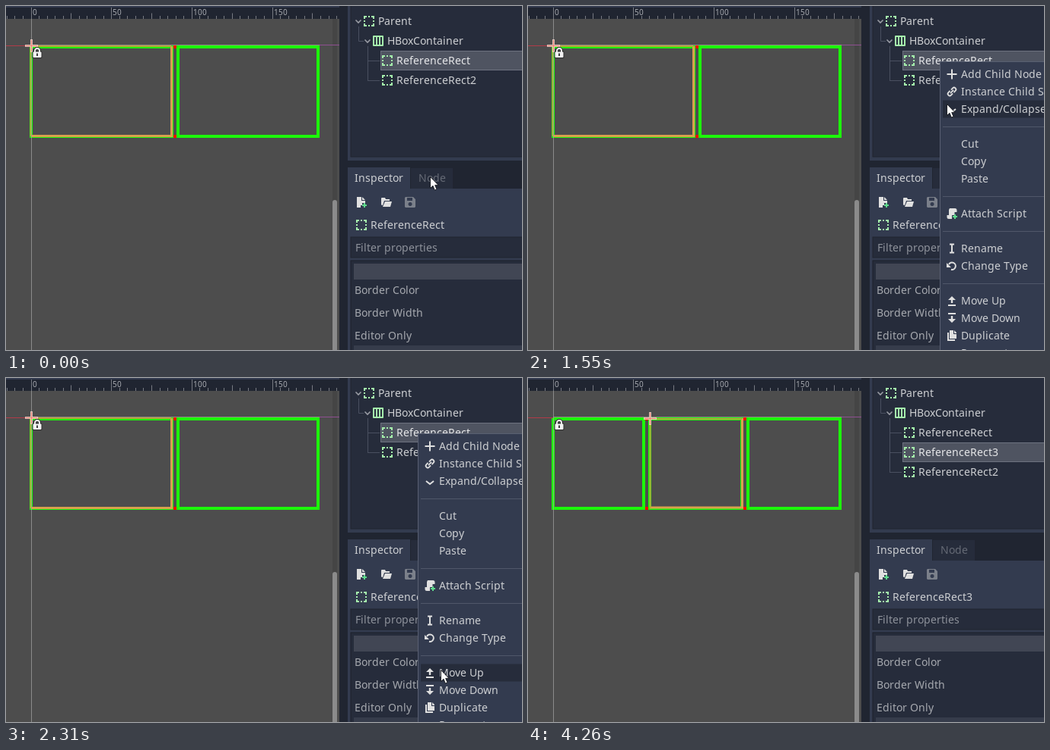
Write an HTML page that moves like this. It is 678 px wide and 454 px high and loops after 4730 ms.

```html
<!DOCTYPE html>
<html lang="en">
<head>
<meta charset="utf-8">
<title>Duplicating a node</title>
<style>
html, body { margin: 0; width: 100%; height: 100%; overflow: hidden; background: #202531; }
svg { display: block; width: 678px; height: 454px; }
text { font-family: "Noto Sans", sans-serif; }
</style>
</head>
<body>
<svg id="stage" viewBox="0 0 678 454" xmlns="http://www.w3.org/2000/svg"></svg>
<script>
const LOOP = 4730;
const BASE = '#333b4f', DARK = '#262c3b', DEEP = '#202531';
const FG = '#cdcfd2', WHITE = '#e0e0e0', GREEN = '#a5efac';

const pen = document.createElement('canvas').getContext('2d');

// Glyph advances snap to whole pixels, as with a hinted UI font.
function text(x, y, str, color = FG, size = 14) {
  pen.font = `${size}px "Noto Sans", sans-serif`;
  const xs = [];
  for (const ch of str) {
    xs.push(x);
    x += Math.round(pen.measureText(ch).width);
  }
  return `<text x="${xs.join(' ')}" y="${y}" fill="${color}" font-size="${size}">${str}</text>`;
}

const box = (x, y, w, h, fill, extra = '') =>
  `<rect x="${x}" y="${y}" width="${w}" height="${h}" fill="${fill}" ${extra}/>`;
const line = (d, color, w = 1, extra = '') =>
  `<path d="${d}" fill="none" stroke="${color}" stroke-width="${w}" ${extra}/>`;
const fill = (d, color) => `<path d="${d}" fill="${color}" fill-rule="evenodd"/>`;
const at = (x, y, body) => `<g transform="translate(${x} ${y})">${body}</g>`;
const group = (id, body) => `<g id="${id}">${body}</g>`;

const rectIcon = (x, y) =>
  at(x, y, line('M6 1H13V13H1V1Z', GREEN, 2, 'stroke-dasharray="2 2 6 2"'));
const hboxIcon = (x, y) =>
  at(x, y, line('M1 1H13V13H1ZM5 1V13M9 1V13', GREEN, 2, 'stroke-linejoin="round"'));
const fold = (x, y) => line(`M${x - 3.5} ${y - 1.5}l3.5 3.5l3.5 -3.5`, '#9a9da5', 1.6);
const plus = (x, y) => line(`M${x - 3} ${y}h6M${x} ${y - 3}v6`, '#5fdc8c', 2);

function ruler() {
  let s = box(0, 0, 438, 2, BASE) + box(0, 2, 438, 15, DEEP);
  for (let i = -3; i <= 38; i++) {
    const x = Math.floor(33 + i * 10.57) + 0.5;
    const top = i % 10 === 0 ? 2 : i % 5 === 0 ? 9.5 : 13;
    s += line(`M${x} ${top}V17`, '#777a82');
    if (i >= 0 && i % 10 === 0) s += text(Math.floor(x) + 2, 12, String(i * 5), '#a5a8ae', 10);
  }
  return s;
}

const canvasArea = () =>
  box(0, 17, 438, 437, '#4d4d4d') +
  box(429, 17, 6, 437, '#454545') +
  box(429, 256, 6, 210, '#8b8b8b', 'rx="3"') +
  ruler();

const lock = () => at(35, 54,
  line('M3 7V5a3 3 0 0 1 6 0V7', '#303030', 4) +
  box(-0.5, 5.5, 13, 9.5, '#303030', 'rx="1.5"') +
  line('M3 7V5a3 3 0 0 1 6 0V7', '#f2f2f2', 1.9) +
  box(0.5, 6.5, 11, 7.5, '#f2f2f2', 'rx="1"') +
  box(5, 8.5, 2, 3.5, '#404040'));

const cross = (x, y) => at(x, y,
  line('M-8 0.5H9M0.5 -8V9', '#f3d3cb', 3, 'opacity=".85"') +
  line('M-7 0.5H8M0.5 -7V8', '#ef8576', 1));

const frame = (x0, x1, color = '#1cf80a') =>
  `<rect x="${x0 + 2}" y="54" width="${x1 - x0 - 4}" height="118" fill="none" stroke="${color}" stroke-width="4"/>`;

function preview(spans, outline, pivot) {
  return frame(31, 412, '#ff0000') +
    spans.map(([a, b]) => frame(a, b)).join('') +
    outline +
    line('M0 52.5H33', '#b23a48') +
    line('M33 51.5H412', '#8f8a84') +
    line('M412 51.5H438', '#8f4f92') +
    line('M33.5 17V454', '#a0a0a0', 1, 'opacity=".75"') +
    cross(...pivot) + lock();
}

function tree(names, chosen) {
  const last = 46 + 26 * names.length;
  let s = line(`M475.5 53V${last + 0.5}` + names.map((_, i) => `M475 ${72.5 + 26 * i}H491`).join(''), '#4a5060');
  names.forEach((name, i) => {
    const y = 72 + 26 * i;
    const on = i === chosen;
    if (on) s += box(492.5, y - 12.5, 200, 25, '#4f5461', 'stroke="#6d7280"');
    s += rectIcon(494, y - 7) + text(513, y + 5, name, on ? '#e6e7e9' : FG);
  });
  return s + text(479, 294, names[chosen]);
}

const panels = () =>
  box(449, 0, 229, 204, BASE) + box(453, -4, 230, 203, DARK, 'stroke="#20242f"') +
  line('M463.5 27V46.5H470', '#4a5060') +
  fold(463, 20) + rectIcon(470, 13) + text(489, 25, 'Parent') +
  fold(475, 46) + hboxIcon(482, 39) + text(501, 51, 'HBoxContainer') +
  box(449, 213, 82, 29, BASE) + box(532, 214, 55, 27, DARK) +
  box(449, 241, 229, 213, BASE) +
  text(458, 232, 'Inspector') + text(542, 232, 'Node', '#656a75') +
  at(461, 252, fill('M0 0H6V5H11V8H7V11H5V14H0ZM7 0L11 4H7Z', WHITE) + plus(10, 11)) +
  at(493, 252, fill('M0 2a1 1 0 0 1 1-1H5L6 3H11V5H4L2 11H1L0 10ZM5 6H14L12 13H2Z', WHITE)) +
  at(524, 252, fill('M0 1L1 0H11L14 3V13L13 14H1L0 13ZM3 1V5H10V1ZM7 7a2.5 2.5 0 1 0 .1 0Z', '#7b808a')) +
  rectIcon(460, 282) +
  box(453, 305, 230, 27, DARK, 'stroke="#20242f"') + text(459, 324, 'Filter properties', '#8d919a') +
  box(453, 336, 230, 125, DARK, 'stroke="#1c202b"') +
  box(457, 340, 221, 21, '#414654') +
  ['Border Color', 'Border Width', 'Editor Only'].map((s, i) => text(458, 380 + 30 * i, s, '#a6a9af')).join('') +
  box(457, 448, 221, 6, '#363c4b');

// Menu rows: label and icon drawn around the row's middle; null is a separator.
const arrow = 'M0 -6L-5 -1H-1.2V3H1.2V-1H5ZM-5 5H5V7H-5Z';
const rows = [
  ['Add Child Node', line('M-6.5 0H6.5M0 -6.5V6.5', WHITE, 2)],
  ['Instance Child Scene', `<g transform="rotate(-45)">${line('M-1 -2.5H-4a2.5 2.5 0 0 0 0 5H-1M1 -2.5H4a2.5 2.5 0 0 1 0 5H1M-3 0H3', WHITE, 1.8)}</g>`],
  ['Expand/Collapse All', line('M-5 0L0 4L5 0', WHITE, 2)],
  null,
  ['Cut', ''], ['Copy', ''], ['Paste', ''],
  null,
  ['Attach Script', fill('M-3 -7H4a2.5 2.5 0 0 1 2.5 2.5V-2H3.5V2H0V7H-4a2.5 2.5 0 0 1-2.500-2.500V2H-4V-5Z', WHITE) + plus(4, 4)],
  null,
  ['Rename', line('M-3 -5.5H3M0 -5.5V5.5M-3 5.5H3', WHITE, 2)],
  ['Change Type', line('M-4 -2A4.700 4.700 0 1 1 -1 4.800', WHITE, 2) + fill('M-7 -4V2H-1Z', WHITE)],
  null,
  ['Move Up', fill(arrow, WHITE)],
  ['Move Down', `<g transform="scale(1 -1)">${fill(arrow, WHITE)}</g>`],
  ['Duplicate', fill('M-3 -7H2V-2H6V4H-3ZM3 -7L6 -4V-3H3ZM-6 -4H-4V5H4V7H-6Z', WHITE)],
  ['Reparent', '']
];
const rowY = i => 90 + 23 * i;

const menu = () =>
  box(541.5, 73.5, 180, 420, BASE, 'stroke="#596072"') +
  box(545, 0, 140, 23, DARK, 'id="hover"') +
  rows.map((row, i) => row
    ? at(557, rowY(i), row[1]) + text(569, rowY(i) + 5, row[0])
    : line(`M545 ${rowY(i) + 0.5}H678`, '#50576a')).join('');

const arrowCursor = () =>
  `<path d="M.5 .5V15.500L4 12.300L6.300 18L9 16.900L6.700 11.400H11Z" fill="#fff" stroke="#15171c" stroke-width=".9"/>`;

const stage = document.getElementById('stage');
stage.innerHTML =
  canvasArea() + panels() +
  group('before',
    preview([[31, 220], [224, 412]],
      line('M217.500 53V171.500H33', '#d9a04e', 3) + line('M32.500 172V53H217', '#b5a83c', 2),
      [33, 52]) +
    tree(['ReferenceRect', 'ReferenceRect2'], 0)) +
  group('after',
    preview([[31, 154], [158, 283], [287, 412]],
      line('M281.500 53V171H160', '#d9a04e', 3) + line('M160.500 172V54H281', '#b5a83c', 2),
      [160, 53]) +
    tree(['ReferenceRect', 'ReferenceRect3', 'ReferenceRect2'], 1)) +
  group('menu', menu()) +
  group('cursor', arrowCursor());

const [before, after, popup, hover, cursor] =
  ['before', 'after', 'menu', 'hover', 'cursor'].map(id => document.getElementById(id));

const smooth = u => u * u * (3 - 2 * u);
const speedUp = u => u ** 1.44;
const slowDown = u => 1 - (1 - u) ** 1.34;

// Each move: first step, last step, number of steps, end point, easing.
const START = [557, 225];
const moves = [
  [80, 540, 7, [542, 77], smooth],
  [610, 610, 1, [541, 73], smooth],
  [1390, 1850, 7, [570, 264], speedUp],
  [1930, 2390, 7, [571, 413], slowDown],
  [2470, 2780, 5, [570, 431], slowDown],
  [4020, 4260, 4, [692, 458], speedUp]
];

function pointer(t) {
  let from = START;
  for (const [t0, t1, n, to, ease] of moves) {
    if (t < t0) break;
    const step = t >= t1 ? n : Math.floor((t - t0) / (t1 - t0) * (n - 1)) + 1;
    const k = ease(step / n);
    if (step < n) return from.map((v, i) => Math.round(v + (to[i] - v) * k));
    from = to;
  }
  return from;
}

const show = (node, on) => node.setAttribute('display', on ? 'inline' : 'none');

function draw(t) {
  const [x, y] = pointer(t);
  const open = t >= 1010 && t < 3390;
  const done = t >= 3470;
  show(before, !done);
  show(after, done);
  show(popup, open);
  const i = Math.round((y - 2 - 90) / 23);
  const hit = open && x > 541 && rows[i];
  show(hover, hit);
  if (hit) hover.setAttribute('y', rowY(i) - 11.5);
  cursor.setAttribute('transform', `translate(${x} ${y})`);
}

const begin = performance.now();
function tick() {
  draw((performance.now() - begin) % LOOP);
  requestAnimationFrame(tick);
}
draw(0);
requestAnimationFrame(tick);
</script>
</body>
</html>
```
